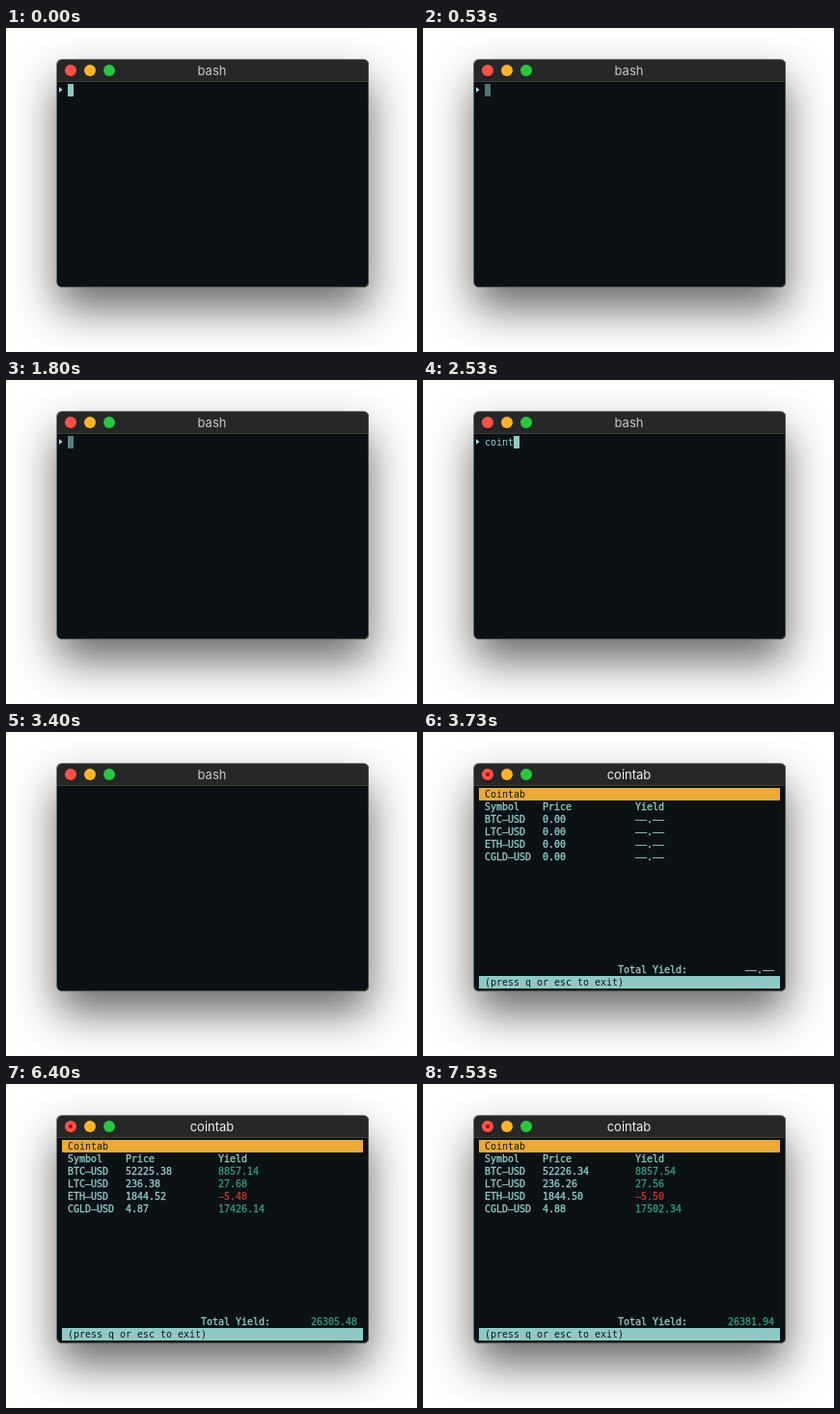
An HTML page that plays this animation: 426x336 px, repeating every 8 s.

```html
<!DOCTYPE html>
<html lang="en">
<head>
<meta charset="utf-8">
<title>Terminal price table</title>
<style>
  html, body { margin: 0; width: 100%; height: 100%; overflow: hidden; background: #fff; }
  .window {
    position: absolute; left: 53px; top: 33px; width: 323px; height: 236px;
    border-radius: 5px; box-shadow: 0 22px 46px rgba(0, 0, 0, .6);
  }
  svg { position: absolute; left: 0; top: 0; display: block; }
  .title { font: 13px Inter, Roboto, sans-serif; text-anchor: middle; }
  .mono { font: 9.97px "DejaVu Sans Mono", "Liberation Mono", monospace; white-space: pre; }
  .table text { stroke: currentColor; stroke-width: .3px; fill: currentColor; }
</style>
</head>
<body>
<div class="window"></div>
<svg id="stage" width="426" height="336" viewBox="0 0 426 336">
  <rect x="53" y="33" width="323" height="236" rx="5" fill="#0b1115"/>
  <path d="M53 55V38a5 5 0 0 1 5-5H371a5 5 0 0 1 5 5V55Z" fill="#262727"/>
  <path d="M53 55.5H376" stroke="#3b403f"/>
  <rect x="52.5" y="32.5" width="323" height="236" rx="5" fill="none" stroke="#59605f" stroke-opacity=".8"/>
  <circle cx="67" cy="44" r="6" fill="#ff5149"/>
  <circle cx="87" cy="44" r="6" fill="#fdb42c"/>
  <circle cx="107" cy="44" r="6" fill="#27c73f"/>
  <circle id="dot" cx="67" cy="44" r="2" fill="#8c1512"/>
  <text id="title" class="title" x="213.5" y="48.7"></text>
  <g id="shell" class="mono" fill="#93d3cc">
    <path d="M55 61.3L58.6 64L55 66.7Z" fill="#a9d8e2"/>
    <text id="typed" x="64" y="67.7"></text>
    <rect id="cursor" y="58" width="6" height="13" fill="#8fcac5"/>
  </g>
  <g id="app" class="mono">
    <rect x="58" y="58" width="312" height="13" fill="#eba938"/>
    <rect x="58" y="253" width="312" height="13" fill="#8fcac5"/>
    <text x="64" y="67.7" fill="#10161a">Cointab</text>
    <text x="64" y="262.7" fill="#10161a">(press q or esc to exit)</text>
    <g id="table" class="table"></g>
  </g>
</svg>
<script>
const LOOP = 8000, CELL = 6, LINE = 13, LEFT = 58, BASE = 67.7;
const TEAL = '#93cfc7', GREEN = '#329c80', RED = '#c3372b';
const COMMAND = 'cointab';
const KEYS = [1930, 2070, 2200, 2270, 2530, 2730, 2930];
const PULSE = 2260, CLEAR = 3400, DRAW = 3470, RETITLE = 3730;
const SYMBOLS = ['BTC', 'LTC', 'ETH', 'CGLD'];

// Each quote: start time, prices, yields.
const QUOTES = [
  [4930, [52221.04, 236.44, 1844.52, 4.88], [8855.33, 27.74, -5.48, 17535.09]],
  [5730, [52223.61, 236.40, 1844.52, 4.87], [8856.40, 27.70, -5.48, 17453.40]],
  [6400, [52225.38, 236.38, 1844.52, 4.87], [8857.14, 27.68, -5.48, 17426.14]],
  [7530, [52226.34, 236.26, 1844.50, 4.88], [8857.54, 27.56, -5.50, 17502.34]]
];

const el = id => document.getElementById(id);
const show = (id, on) => el(id).setAttribute('visibility', on ? 'visible' : 'hidden');
const dash = s => s.replace(/-/g, '\u2013');

function label(col, row, text = '') {
  const node = document.createElementNS('http://www.w3.org/2000/svg', 'text');
  node.setAttribute('x', LEFT + col * CELL);
  node.setAttribute('y', BASE + row * LINE);
  node.style.color = TEAL;
  node.textContent = dash(text);
  el('table').append(node);
  return node;
}

label(1, 1, 'Symbol');
label(11, 1, 'Price');
label(27, 1, 'Yield');
label(24, 14, 'Total Yield:');
const rows = SYMBOLS.map((name, i) => {
  label(1, i + 2, name + '-USD');
  return { price: label(11, i + 2), gain: label(27, i + 2) };
});
const total = label(51, 14);
total.setAttribute('text-anchor', 'end');

function setGain(node, value) {
  const known = value !== undefined;
  node.textContent = dash(known ? value.toFixed(2) : '--.--');
  node.style.color = !known ? TEAL : value < 0 ? RED : GREEN;
}

let shown;
function setQuote(quote) {
  if (quote === shown) return;
  shown = quote;
  const [, prices, gains] = quote || [0, [0, 0, 0, 0], []];
  rows.forEach((row, i) => {
    row.price.textContent = prices[i].toFixed(2);
    setGain(row.gain, gains[i]);
  });
  setGain(total, quote ? gains.reduce((a, b) => a + b) : undefined);
}

function render(t) {
  const count = KEYS.filter(k => k <= t).length;
  const phase = t % PULSE / PULSE;
  el('typed').textContent = COMMAND.slice(0, count);
  el('cursor').setAttribute('x', 64 + count * CELL);
  el('cursor').setAttribute('opacity', count ? 1 : Math.abs(1 - 2 * phase));
  show('shell', t < CLEAR);
  show('app', t >= DRAW);
  show('dot', t >= RETITLE);
  el('title').textContent = t < RETITLE ? 'bash' : COMMAND;
  el('title').setAttribute('fill', t < RETITLE ? '#c6cac9' : '#eef0ef');
  setQuote(QUOTES.filter(q => q[0] <= t).pop() || null);
}

function frame() {
  render(performance.now() % LOOP);
  requestAnimationFrame(frame);
}
frame();
</script>
</body>
</html>
```
